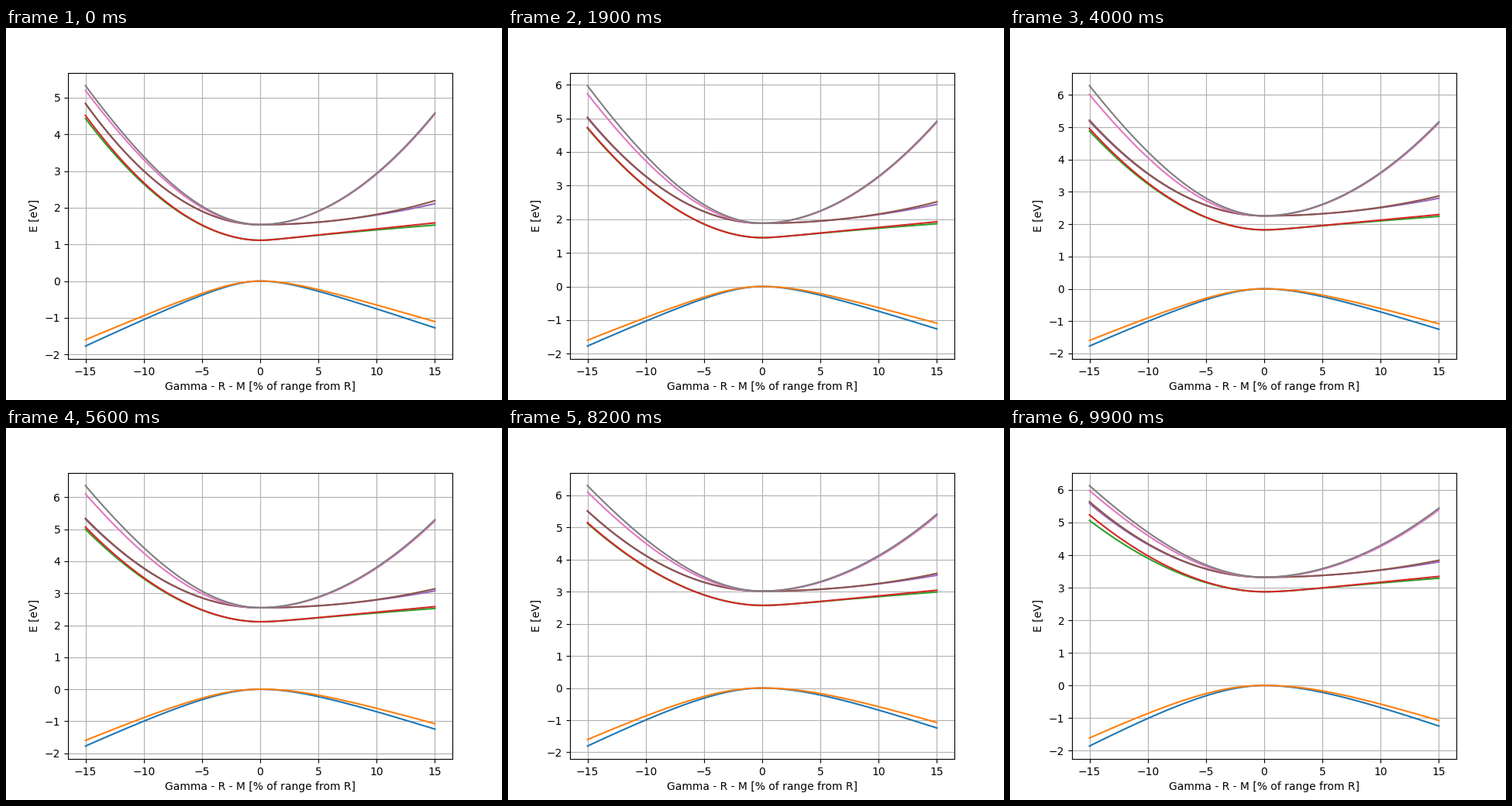
These frames come from a looping animation (640x480 px, 10 s). A matplotlib script:

```python
import matplotlib.pyplot as plt
import numpy as np
from matplotlib.animation import FuncAnimation

FRAMES = 100
X_END = 15
x = np.linspace(-X_END, X_END, 121)


def rise(power, width=1):
    """0 at x = 0, flat there, bending to a power law, 1 at the ends."""
    def grow(s):
        return (1 + (s / width) ** 2) ** (power / 2) - 1
    return grow(x) / grow(X_END)


def pair(edge, mean, split):
    """Lower and upper band around a common mean."""
    half = np.abs(split) / 2
    return [edge + mean - half, edge + mean + half]


def sides(left, right):
    return np.where(x < 0, left, right)


def valence(u):
    bend = rise(1, 3.7 + 3.8 * u)
    mean = sides(-1.685 - .05 * u**5, -1.19 + .075 * u - .045 * u**2) * bend
    split = sides(.172 + .075 * u**5, .17) * rise(1.1)
    return pair(0, mean, split)


def lower(u):
    left = (3.36 - .36 * u - .725 * u**2) * rise(1.9 - .04 * u)
    right = .444 * rise(.9, 1 + 1.4 * u)
    twist = .7 * (u - .475)**2 - .077 + .055 * u**8
    split = sides(twist, .06 - .005 * u) * rise(2)
    return pair(1.113 + 1.762 * u, sides(left, right), split)


def middle(u):
    left = 3.3 - .8 * u - .21 * u**2
    right = .613 - .06 * u - .058 * u**2
    twist = .25 * (u - .4)**2 - .035
    split = sides(twist * rise(2), (.083 - .03 * u) * rise(4))
    return pair(1.538 + 1.784 * u, sides(left, right) * rise(2), split)


def upper(u):
    left = 3.724 + 2.379 * u - 6.706 * u**2 + 5.336 * u**3 - 2 * u**4
    right = 3.03 + .214 * u - 1.523 * u**2 + .374 * u**3
    mean = sides(left * rise(1, 15), right * rise(1.92))
    gap = .13 + .828 * u - 1.374 * u**2 + .567 * u**3
    split = sides(gap * rise(1), (.03 + .02 * u) * rise(.5))
    return pair(1.538 + 1.784 * u, mean, split)


def bands(frame):
    u = frame / (FRAMES - 1)
    return valence(u) + lower(u) + middle(u) + upper(u)


fig, ax = plt.subplots(figsize=(6.4, 4.8), dpi=100)
lines = [ax.plot(x, y)[0] for y in bands(0)]
ax.set_xlabel("Gamma - R - M [% of range from R]")
ax.set_ylabel("E [eV]")
ax.grid(True)


def update(frame):
    for line, y in zip(lines, bands(frame)):
        line.set_ydata(y)
    ax.relim()
    ax.autoscale_view()
    return lines


anim = FuncAnimation(fig, update, frames=FRAMES, interval=100,
                     repeat=True, repeat_delay=0, blit=False)
plt.show()
```
